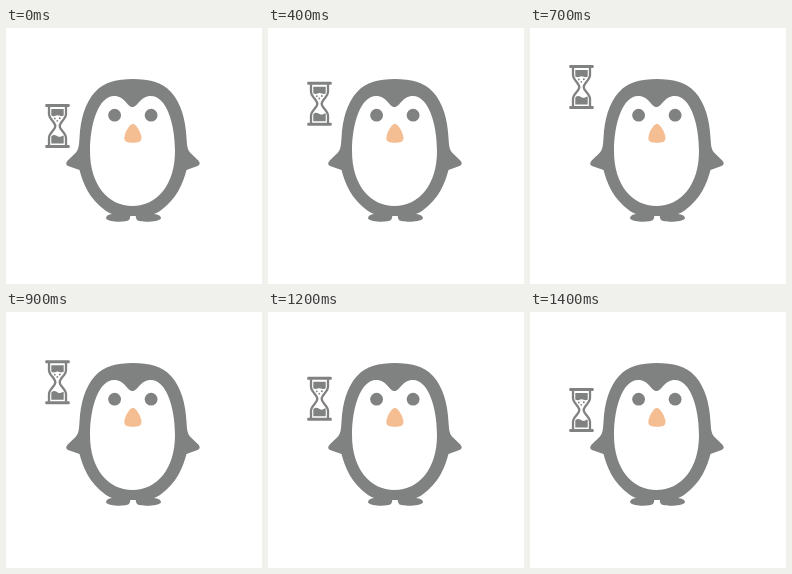
Animation, 256 px wide and 256 px high, one loop 1.5 s. Source, as an HTML page:

```html
<!DOCTYPE html>
<html lang="en">
<head>
<meta charset="utf-8">
<title>Penguin and hourglass</title>
<style>
html, body { margin: 0; width: 100%; height: 100%; overflow: hidden; background: #fff; }
svg { display: block; width: 100vw; height: 100vh; }
</style>
</head>
<body>
<svg viewBox="0 0 256 256">
  <g fill="#808281">
    <path d="M126.800 51C143 51 156 54 165 64C175 75 179.500 91 180.500 110C181 118 181.500 122 184.500 125L192.300 132.500Q195.500 136 191.500 138L180.500 142C177 155 171 171 154 183Q151 185 148 186C152.500 186.500 155 188 155 190.500C152 194.500 134 194.500 131 192Q129.500 190 129.800 188H124.200Q124.500 190 123 192C120 194.500 103 194.500 100 190.500C100 188 102 186.500 106 186Q103 185 100 183C83 171 77 155 73.500 142L62 138Q58.500 136 61.700 132.500L69.500 125C72.500 122 73 118 73.500 110C74.500 91 79 75 89 64C98 54 111 51 126.800 51Z"/>
    <path fill="#fff" d="M126.500 79C121 79 119 68 108 68C93 68 84 95 84 123C84 157 102 178 126.500 178C151 178 169 157 169 123C169 95 160 68 145 68C134 68 132 79 126.500 79Z"/>
    <circle cx="108.600" cy="87.200" r="6.400"/>
    <circle cx="145.100" cy="87.200" r="6.400"/>
  </g>
  <path fill="#f5bd92" d="M126.900 95.700C130 95.700 135.500 105 135.500 110C135.500 114 132 114.800 126.900 114.800C121.800 114.800 118.300 114 118.300 110C118.300 105 123.800 95.700 126.900 95.700Z"/>
  <g id="glass" fill="#808281">
    <rect x="39.200" width="24.600" height="3" rx="1.200"/>
    <rect x="39.200" y="41" width="24.600" height="3" rx="1.200"/>
    <path fill="none" stroke="#808281" stroke-width="2.300" d="M43 2.500V10C43 15 49.300 18 49.300 22C49.300 26 43 29 43 34V41.500M60 2.500V10C60 15 53.700 18 53.700 22C53.700 26 60 29 60 34V41.500"/>
    <path d="M45.300 5H57.700V11.500C55 13.500 53 10.500 50.500 11.500C48 12.500 47 12.500 45.300 11.500Z"/>
    <path d="M45.300 39.500V32.500C48 29.500 50 31.500 52 32.500C54 33.500 56 32 57.700 31.500V39.500Z"/>
    <circle cx="48.800" cy="14.500" r=".9"/>
    <circle cx="53.800" cy="14.300" r="1"/>
    <circle cx="51.300" cy="16.800" r=".9"/>
  </g>
</svg>
<script>
const glass = document.getElementById("glass");
const STEP = 100, STEPS = 15, LOW = 76, HIGH = 37;

function draw(ms) {
  const step = Math.floor(ms / STEP) % STEPS;
  const rise = 1 - Math.abs(step - 7) / 7;
  glass.setAttribute("transform", `translate(0 ${LOW + (HIGH - LOW) * rise})`);
}

const start = performance.now();
function tick(now) {
  draw(Math.max(0, now - start));
  requestAnimationFrame(tick);
}
draw(0);
requestAnimationFrame(tick);
</script>
</body>
</html>
```
